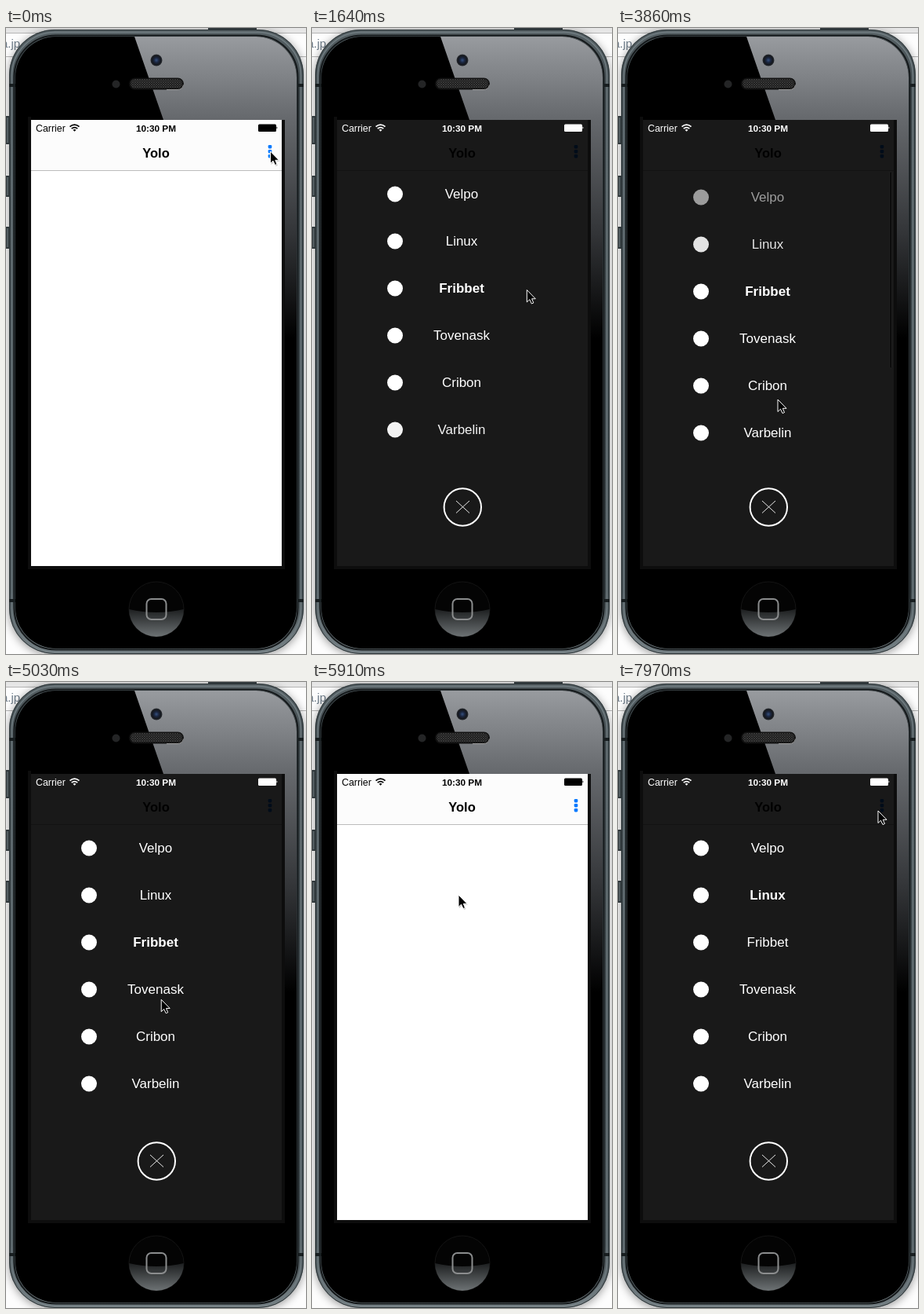
These frames come from a looping animation (383x797 px, 8 s). An HTML page:

```html
<!DOCTYPE html>
<html lang="en">
<head>
<meta charset="utf-8">
<title>Phone menu</title>
<style>
html, body { margin: 0; width: 100%; height: 100%; overflow: hidden; background: #fdfdfd; }
svg { display: block; font-family: "Liberation Sans", Arial, sans-serif; }
.mid { text-anchor: middle; }
.bold { font-weight: bold; }
</style>
</head>
<body>
<svg width="383" height="797" viewBox="0 0 383 797">
  <defs>
    <linearGradient id="steel" x2="0" y2="1">
      <stop stop-color="#566064"/><stop offset=".1" stop-color="#3f494d"/>
      <stop offset=".9" stop-color="#414b4f"/><stop offset="1" stop-color="#7a8488"/>
    </linearGradient>
    <linearGradient id="glare" gradientUnits="userSpaceOnUse" x1="0" y1="11" x2="0" y2="395">
      <stop stop-color="#989b9f"/><stop offset=".27" stop-color="#66696d"/>
      <stop offset=".65" stop-color="#333538"/><stop offset="1" stop-color="#000"/>
    </linearGradient>
    <linearGradient id="shine" x2="0" y2="1">
      <stop stop-color="#1d1f20"/><stop offset="1" stop-color="#6d7274"/>
    </linearGradient>
    <radialGradient id="lens">
      <stop stop-color="#35507f"/><stop offset=".4" stop-color="#1b263f"/>
      <stop offset=".75" stop-color="#15181e"/><stop offset="1" stop-color="#2b2e33"/>
    </radialGradient>
    <pattern id="mesh" width="3" height="3" patternUnits="userSpaceOnUse">
      <path fill="#191919" d="M0 0h3v3H0z"/><path stroke="#444" stroke-width=".7" d="M0 0 3 3M3 0 0 3"/>
    </pattern>
    <filter id="blur"><feGaussianBlur stdDeviation="6"/></filter>
    <clipPath id="front"><rect x="12" y="11" width="359" height="779" rx="52"/></clipPath>
    <clipPath id="table"><path d="M32 182h320v360H32z"/></clipPath>
  </defs>

  <!-- page behind the phone -->
  <path fill="#fdfdfd" d="M0 0h383v797H0z"/>
  <path fill="#e6e6e6" d="M0 0h383v6H0z"/>
  <path stroke="#b5b5b5" d="M0 6.5h383M0 36.5h383"/>
  <text x="-6" y="25" font-size="15" fill="#6c7a87">a.jp</text>

  <!-- phone -->
  <rect x="4" y="4" width="376" height="795" rx="58" opacity=".4" filter="url(#blur)"/>
  <path fill="#30383b" d="M258 0h62v6h-62zM0 112h6v36H0zM0 188h6v27H0zM0 253h6v28H0z"/>
  <path stroke="#79858a" d="M2 114v32M2 190v23M2 255v24"/>
  <rect x="4" y="2" width="376" height="795" rx="58" fill="url(#steel)"/>
  <rect x="4.500" y="2.500" width="375" height="794" rx="57.500" fill="none" stroke="#2c3538"/>
  <rect x="7.500" y="5.500" width="369" height="788" rx="55" fill="none" stroke="#707c81" stroke-width="1.500"/>
  <rect x="10.500" y="9.500" width="362" height="782" rx="53" fill="none" stroke="#15191b" stroke-width="2"/>
  <path stroke="#181e20" stroke-width="4" d="M4 73h8M372 73h8M4 729h8M372 729h8"/>
  <g clip-path="url(#front)">
    <path d="M0 0h383v797H0z"/>
    <path fill="url(#glare)" d="M164 11h207v389h-19V117H201z"/>
  </g>
  <path fill="#0d0d0d" d="M28 113h4v572h320V117h4v572H28z"/>
  <circle cx="192" cy="41" r="7.500" fill="url(#lens)"/>
  <circle cx="140.500" cy="71.500" r="5" fill="#242526"/>
  <rect x="157" y="63.500" width="70" height="15" rx="7.500" fill="#111"/>
  <rect x="159" y="65" width="66" height="11.500" rx="5.500" fill="url(#mesh)"/>
  <path d="M205 78.500h14q6 0 7.500-6" fill="none" stroke="#999"/>
  <circle cx="192" cy="740" r="35" fill="#040404" stroke="#141414"/>
  <path fill="url(#shine)" d="M157 740q35 8 70 0a35 35 0 0 1-70 0z"/>
  <rect x="179.500" y="727" width="25" height="26" rx="6" fill="none" stroke="#8b8d8e" stroke-width="2"/>

  <!-- screen -->
  <path fill="#fff" d="M32 117h320v568H32z"/>
  <path fill="#fcfcfc" d="M32 117h320v64H32z"/>
  <path stroke="#bcbcbc" d="M32 181.500h320"/>
  <text class="mid bold" x="191.500" y="165" font-size="16.500">Yolo</text>
  <g id="dots" fill="#0a7aff">
    <rect x="334.700" y="149" width="4.600" height="4.400" rx="1.300"/>
    <rect x="334.700" y="155" width="4.600" height="4.400" rx="1.300"/>
    <rect x="334.700" y="161" width="4.600" height="4.400" rx="1.300"/>
  </g>
  <path id="bands" opacity=".04" d="M32 117h320v64H32zM32 617l320-2v70H32z"/>

  <g id="menu">
    <path opacity=".9" d="M32 117h320v568H32z"/>
    <g clip-path="url(#table)"><g id="rows" fill="#fff" font-size="17"></g></g>
    <rect id="bar" x="347" width="2.500" height="250" rx="1.200" fill="#080808" stroke="#2b2b2b" stroke-width=".6"/>
    <circle cx="192.300" cy="610" r="23.700" fill="none" stroke="#fff" stroke-width="2"/>
    <path stroke="#e8e8e8" d="M184 602l17 15.500M201 602l-17 15.500"/>
  </g>

  <g id="status">
    <text x="38" y="132" font-size="12.400">Carrier</text>
    <text class="mid bold" x="191.500" y="132" font-size="11.800">10:30 PM</text>
    <path d="M81.500 125.700q6-5.200 12 0M83.700 128.200q3.800-3.200 7.600 0" fill="none" stroke="currentColor" stroke-width="1.700"/>
    <path d="M85.500 129.700q2-1.500 4 0l-2 2zM345.500 125.500q2 1.500 0 3z"/>
    <rect x="322" y="122.500" width="23" height="9.500" rx="1.500"/>
  </g>

  <g id="cursor">
    <path d="M0 0V15.500L3.500 12.200 6 17.500 8.500 16.500 6.300 11.300H11Z" transform="translate(1 1.500)" opacity=".2"/>
    <path d="M0 0V15.500L3.500 12.200 6 17.500 8.500 16.500 6.300 11.300H11Z" stroke="#fff"/>
  </g>
</svg>
<script>
const LOOP = 8000, ROW = 60, FIRST_Y = 211.5;
const OPEN = [960, 7160], CLOSE = 5570, FADE = 300;
const names = ["Velpo", "Linux", "Fribbet", "Tovenask", "Cribon", "Varbelin", "Android", "Ilopharum"];
const $ = id => document.getElementById(id);
const clamp = x => Math.max(0, Math.min(1, x));

// Bursts of screen updates: first, last, count
const bursts = [[1050, 2090, 8], [2380, 3420, 8], [3570, 4590, 8], [4730, 5760, 8],
  [5910, 5910, 1], [6210, 6660, 4], [7100, 7970, 7]];
const ticks = bursts.flatMap(([a, b, n]) => Array.from({ length: n },
  (_, k) => Math.floor((a + (b - a) * k / Math.max(1, n - 1)) / 10) * 10));

// Keys: time, then values
const cursorKeys = [[1200, 337.5, 157], [2090, 209, 516], [2380, 209, 516], [2820, 207, 390],
  [3270, 207, 386], [3500, 206, 346], [3860, 204, 473], [4730, 204, 473],
  [5470, 187, 271], [6060, 187, 271], [6660, 332, 164]];
const scrollKeys = [[2330, 0], [2820, 135], [3270, 120], [3450, 120], [3860, -4], [4300, 0]];
const barKeys = [[2330, 0], [2400, 1], [3200, 1], [3400, 0], [3500, 0], [3600, 1], [4300, 1], [4590, 0]];

function track(keys, t) {
  const i = keys.findIndex(k => k[0] > t);
  if (i === 0) return keys[0].slice(1);
  if (i < 0) return keys[keys.length - 1].slice(1);
  const a = keys[i - 1], b = keys[i];
  const p = (t - a[0]) / (b[0] - a[0]), e = p * p * (3 - 2 * p);
  return a.slice(1).map((v, j) => v + (b[j + 1] - v) * e);
}

$("rows").innerHTML = names.map(name =>
  `<g><circle cx="106" r="10"/><text class="mid" x="191" y="5.500">${name}</text></g>`).join("");
const rows = [...$("rows").children];

function rowAlpha(i, t, opened) {
  if (i > 5) return clamp((t - 2560 - (i - 6) * 145) / 500);
  if (i < 2 && t > 3400 && t < CLOSE) return clamp((t - (i ? 3420 : 3575)) / 500);
  return clamp((t - opened - 100 - 40 * i) / 400);
}

function draw(t) {
  const opened = t < OPEN[1] ? OPEN[0] : OPEN[1];
  const closing = t >= CLOSE && t < OPEN[1];
  const shown = closing ? clamp(1 - (t - CLOSE) / FADE) : clamp((t - opened) / FADE);
  const light = shown > 0 && !closing;
  const press = t < 6000 ? 1050 : 7100;
  const [offset] = track(scrollKeys, t);
  const [x, y] = track(cursorKeys, t);
  const chosen = t < 6000 ? 2 : 1;

  $("menu").setAttribute("opacity", shown);
  $("bands").style.display = light && shown < 1 ? "" : "none";
  $("dots").setAttribute("opacity", t < press ? 1 : .25 + .75 * clamp((t - press - 100) / 300));
  $("status").setAttribute("fill", light ? "#fff" : "#000");
  $("status").style.color = light ? "#fff" : "#000";
  rows.forEach((row, i) => {
    row.setAttribute("transform", `translate(0 ${FIRST_Y + i * ROW - offset})`);
    row.setAttribute("opacity", rowAlpha(i, t, opened));
    row.lastChild.classList.toggle("bold", i === chosen);
  });
  $("bar").setAttribute("y", 183 + Math.max(0, offset) * .75);
  $("bar").setAttribute("opacity", track(barKeys, t)[0]);
  $("cursor").setAttribute("transform", `translate(${x} ${y})`);
}

function frame() {
  const now = performance.now() % LOOP;
  draw(ticks.reduce((last, tick) => tick <= now ? tick : last, 0));
  requestAnimationFrame(frame);
}
frame();
</script>
</body>
</html>
```
